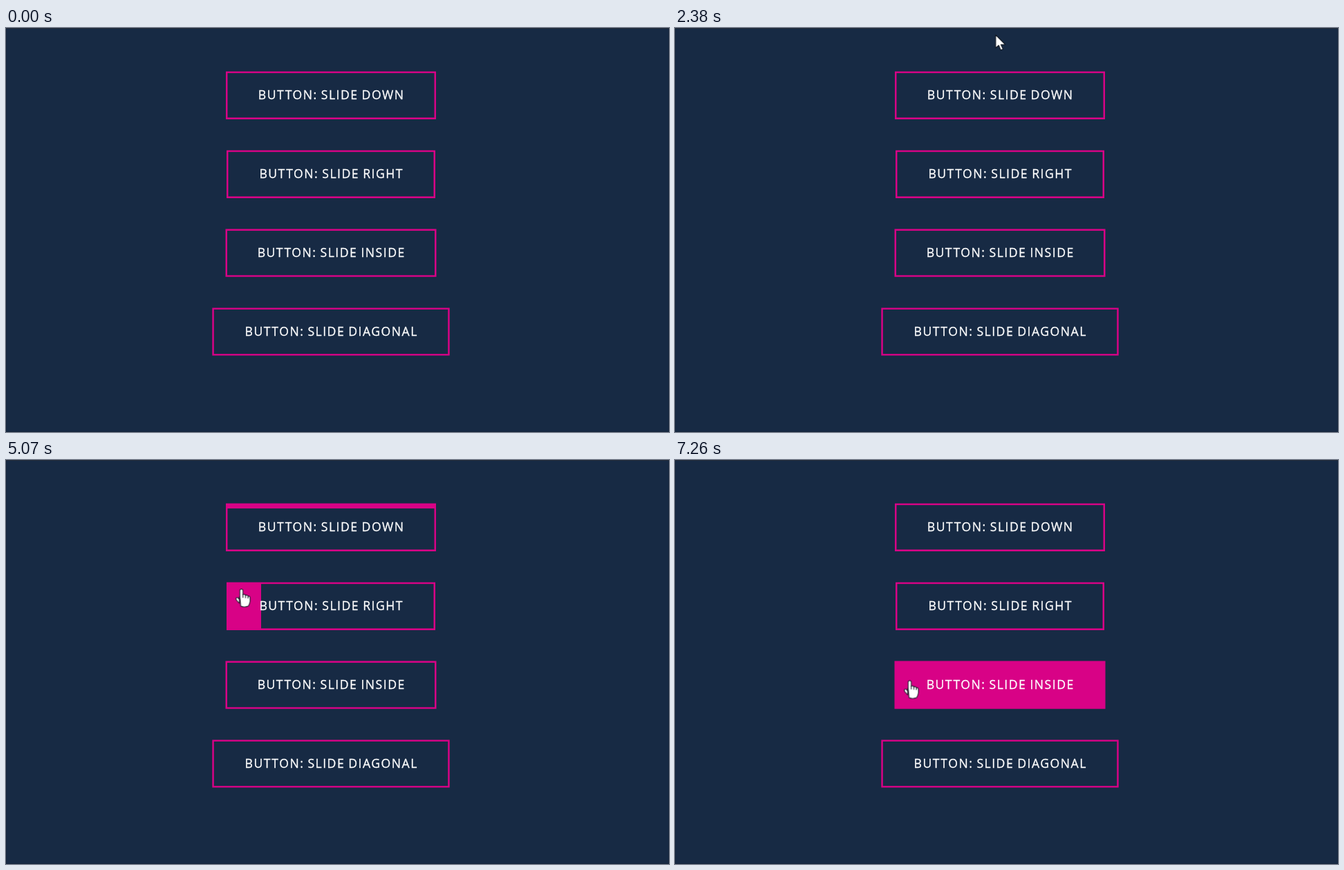
These frames come from a looping animation (959 by 584 pixels, 8 s). An HTML page:

```html
<!DOCTYPE html>
<html lang="en">
<head>
<meta charset="utf-8">
<title>Button hover effects</title>
<style>
html, body { margin: 0; width: 100%; height: 100%; overflow: hidden; background: #172a44; }
body > svg { display: block; width: 959px; height: 584px; }
.edge { fill: none; stroke: #14243a; }
.top { fill: #242c38; }
.frame { fill: none; stroke: #d80286; stroke-width: 5px; }
.fill { fill: #d80286; }
text {
  font: 400 17.6px "Open Sans", "Noto Sans", sans-serif;
  letter-spacing: 1.5px; word-spacing: -1px;
  text-anchor: middle; fill: #fff; stroke: #fff; stroke-width: .3px;
}
.down, .right, .inside, #cursor, #arrow, #hand { animation: 8s linear infinite; }
.down { height: 0; animation-name: down; }
.right { width: 0; animation-name: right; }
.inside { animation-name: inside; }
#cursor { animation-name: travel; }
#arrow { animation-name: arrow; animation-timing-function: step-end; }
#hand { animation-name: hand; animation-timing-function: step-end; }
#arrow, #hand { fill: #fff; stroke: #141a24; stroke-width: 1.1px; stroke-linejoin: round; }

@keyframes down {
  0% { height: 0; }
  38% { height: 0; animation-timing-function: ease-out; }
  41.75%, 60.45% { height: 102px; animation-timing-function: ease-out; }
  64.2%, 100% { height: 0; }
}
@keyframes right {
  0% { width: 0; }
  63.1% { width: 0; animation-timing-function: ease-out; }
  66.85%, 85.7% { width: 402px; animation-timing-function: ease-out; }
  89.45%, 100% { width: 0; }
}
@keyframes inside {
  0% { stroke-width: 5px; }
  87.6% { stroke-width: 5px; animation-timing-function: ease-out; }
  91.35%, 100% { stroke-width: 105px; }
}
@keyframes travel {
  0%, 4.75% { transform: translate(928px, 576px); animation-timing-function: ease-out; }
  13.25% { transform: translate(786px, 103px); }
  16.625% { transform: translate(786px, 103px); animation-timing-function: ease-in-out; }
  26.375%, 27.25% { transform: translate(547px, 8px); }
  29.75% { transform: translate(464px, 10px); animation-timing-function: ease-out; }
  32.375% { transform: translate(436px, 9px); }
  36.625% { transform: translate(436px, 9px); animation-timing-function: ease-out; }
  41.625% { transform: translate(436.5px, 72px); }
  52.5% { transform: translate(436.5px, 72px); animation-timing-function: ease-in; }
  60.5% { transform: translate(366px, 132px); }
  61.625%, 62.625% { transform: translate(361px, 166px); }
  63.375% { transform: translate(340.5px, 186px); animation-timing-function: ease-out; }
  65.75% { transform: translate(339px, 200px); }
  82% { transform: translate(339px, 200px); animation-timing-function: ease-in-out; }
  90.75%, 100% { transform: translate(339.5px, 318.5px); }
}
@keyframes arrow {
  0% { visibility: hidden; }
  4.75% { visibility: visible; }
  38% { visibility: hidden; }
  60.45% { visibility: visible; }
  63.1% { visibility: hidden; }
  85.7% { visibility: visible; }
  87.6%, 100% { visibility: hidden; }
}
@keyframes hand {
  0% { visibility: hidden; }
  38% { visibility: visible; }
  60.45% { visibility: hidden; }
  63.1% { visibility: visible; }
  85.7% { visibility: hidden; }
  87.6%, 100% { visibility: visible; }
}
</style>
</head>
<body>
<svg viewBox="0 0 959 584">
  <rect class="edge" x=".5" y=".5" width="958" height="583"/>
  <rect class="top" width="959" height="1"/>

  <svg x="318" y="62.7" width="304" height="69.2">
    <rect class="fill down" width="100%"/>
    <rect class="frame" width="100%" height="100%"/>
  </svg>
  <svg x="319" y="176.7" width="302" height="69.2">
    <rect class="fill right" height="100%"/>
    <rect class="frame" width="100%" height="100%"/>
  </svg>
  <svg x="317.5" y="290.6" width="305" height="69.2">
    <rect class="frame inside" width="100%" height="100%"/>
  </svg>
  <svg x="298.3" y="404.4" width="343.4" height="69.2">
    <rect class="frame" width="100%" height="100%"/>
  </svg>

  <text x="470.7" y="103">BUTTON: SLIDE DOWN</text>
  <text x="470.7" y="217">BUTTON: SLIDE RIGHT</text>
  <text x="470.7" y="331">BUTTON: SLIDE INSIDE</text>
  <text x="470.7" y="445">BUTTON: SLIDE DIAGONAL</text>

  <g id="cursor">
    <path id="arrow" d="M0 0V19L4.4 15L7.4 22L10.6 20.6L7.6 14H14Z"/>
    <g id="hand">
      <path d="M-2.2 2Q0-1.6 2.2 2V8.6Q4.6 7 6 9.6Q8.4 8.2 9.6 10.8Q12.4 10 12.6 13V18Q12 22 10 25Q4 27.4-1 25Q-3-.6-3 21L-7.4 16Q-8.6 12-5 13L-2.2 16Z"/>
      <path fill="none" d="M2.2 8V13M6 9.6V13.6M9.6 10.8V14"/>
    </g>
  </g>
</svg>
</body>
</html>
```
